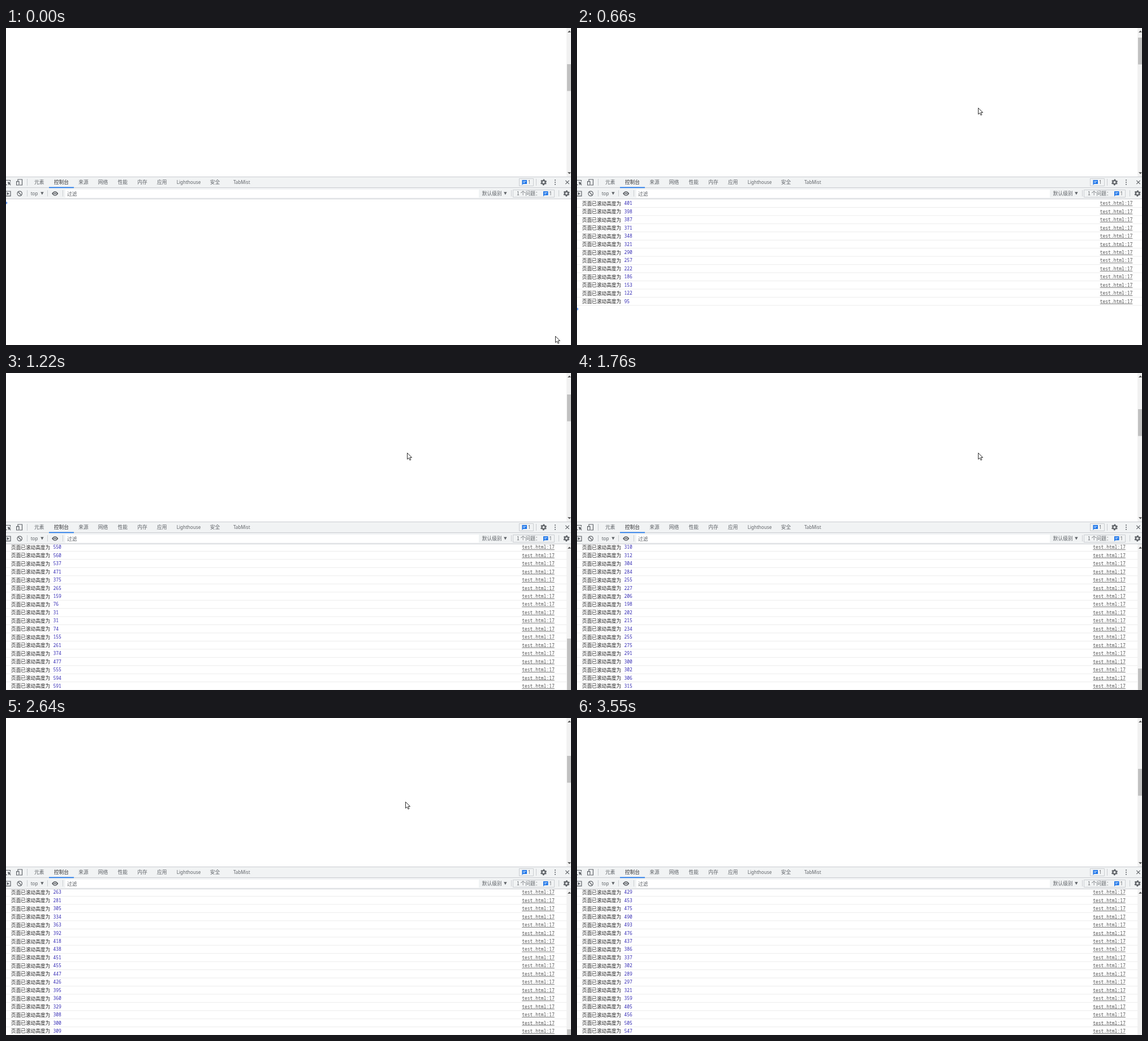
Recreate the animation shown at these times as an HTML page. Size 999 by 561 pixels, loop 4.15 s.

```html
<!DOCTYPE html>
<html lang="zh-CN">
<head>
<meta charset="utf-8">
<style>
html, body { margin: 0; width: 100%; height: 100%; overflow: hidden; background: #fff; }
svg { display: block; width: 999px; height: 561px; }
text { font: 8.1px "Noto Sans", "Noto Sans CJK SC", sans-serif; fill: #5f6368; }
.cjk { font: 8.75px "Noto Sans CJK SC", "Noto Sans CJK", sans-serif; }
.on { fill: #303134; }
.msg { font: 8.65px "Noto Sans CJK SC", "Noto Sans CJK", sans-serif; fill: #222; }
.num, .link { font: 8px "Noto Sans Mono", "DejaVu Sans Mono", monospace; }
.num { fill: #332ab4; }
.link { fill: #545454; text-decoration: underline; }
.ico { fill: none; stroke: #5f6368; stroke-width: 1.2; }
.sep { stroke: #cacdd1; fill: none; }
</style>
</head>
<body>
<svg viewBox="0 0 999 561">
  <defs>
    <g id="gear">
      <circle r="3.1" class="ico" style="stroke-width:2.2"/>
      <circle r="4.6" class="ico" style="stroke-width:1.8" stroke-dasharray="2.4 2.417" transform="rotate(15)"/>
    </g>
    <g id="chat">
      <path d="M0 0h8.5v7h-6.5l-2 2z" fill="#1a73e8"/>
      <path d="M1.7 2.4h5.2M1.7 4.6h3.6" stroke="#fff" stroke-width=".9"/>
    </g>
    <path id="down" d="M0 0h5.4l-2.7 5z" fill="#5f6368"/>
  </defs>

  <rect x="991" width="8" height="263" fill="#f1f1f1"/>
  <path d="M993 8l3.2-3.4 2.8 3zM993 255l3.2 3.4 2.8-3z" fill="#505050"/>
  <rect id="pageThumb" x="992" width="7" height="47.5" fill="#c1c1c1"/>

  <g id="log"></g>
  <path id="prompt" d="M-1 -2.6l2.8 2.6-2.8 2.6" fill="none" stroke="#367cf1" stroke-width="1.3"/>
  <g id="logBar">
    <rect x="991" y="303" width="8" height="258" fill="#f1f1f1"/>
    <path d="M993 311l3.2-3.4 2.8 3z" fill="#505050"/>
    <rect id="logThumb" x="992" width="7" height="120" fill="#c1c1c1"/>
  </g>

  <rect y="263" width="999" height="40" fill="#f1f3f4"/>
  <path class="sep" d="M0 263.5H999M0 282.5H999M0 302.5H999"/>
  <path class="sep" d="M37.5 267v12M937.5 267v12M37.5 287v11M73.5 287v11M100.5 287v11M893.5 287v11M977.5 287v11"/>
  <rect x="76" y="281.5" width="44" height="1.7" fill="#1a73e8"/>
  <rect x="105" y="286" width="731" height="14" fill="#fff"/>
  <g id="tabs"></g>
  <text x="402" y="276.3">TabMist</text>
  <text x="43.7" y="296">top</text>
  <text x="108" y="296.6" class="cjk">过滤</text>
  <text x="841.7" y="296.3" class="cjk">默认级别</text>
  <text x="903" y="296.3" class="cjk">1 个问题：</text>
  <text x="923" y="276.2">1</text>
  <text x="960.5" y="296">1</text>

  <path class="ico" d="M0 269.5h7.5v2.5M0 277.5h2"/>
  <path d="M3 272l6 2.3-2.5 1 2.2 2.2-1 1-2.2-2.2-1 2.2z" fill="#5f6368"/>
  <path class="ico" d="M21 271v-3h7.5v10h-4.5M18.6 271.6h4.4v6.4h-4.4z"/>
  <path class="ico" d="M0 289h8v8.4H0"/>
  <path d="M1.5 290.6l4.5 2.6-4.5 2.6z" fill="#5f6368"/>
  <circle class="ico" cx="24.2" cy="293" r="4.2"/>
  <path class="ico" d="M21.3 290l5.9 6"/>
  <path d="M81 293q5.7-8 11.4 0q-5.7 8-11.4 0z" fill="#5f6368"/>
  <circle cx="86.7" cy="293" r="2" fill="#5f6368" stroke="#f1f3f4" stroke-width="1.1"/>
  <use href="#down" x="61.2" y="290.3"/>
  <use href="#down" x="880.2" y="290.3"/>

  <path class="sep" d="M907.5 266.5h25v13h-25zM896.5 286.5h73v13h-73z"/>
  <use href="#chat" x="912.5" y="269"/>
  <use href="#chat" x="950" y="289"/>
  <use href="#gear" x="950.5" y="273"/>
  <use href="#gear" x="991" y="292.7"/>
  <path d="M971 269.2v.01M971 273v.01M971 276.8v.01" stroke="#5f6368" stroke-width="2.1" stroke-linecap="round"/>
  <path class="ico" d="M989.3 269.8l6.4 6.4m0-6.4l-6.4 6.4"/>

  <path id="cursor" d="M.5 .5v11.2l2.6-2.4 1.9 4 1.8-.8-1.8-3.9h3.6z" fill="#fff" stroke="#222" stroke-width=".95"/>
</svg>
<script>
const LOOP = 4150, STEP = 68.7, FIRST = 40;
const PITCH = 14.45, ROWS = 18, LAST = 172;
const $ = id => document.getElementById(id);
const set = (id, name, value) => $(id).setAttribute(name, value);
const show = (id, on) => set(id, "display", on ? "inline" : "none");

function add(parent, tag, attrs, text) {
  const el = document.createElementNS("http://www.w3.org/2000/svg", tag);
  for (const k in attrs) el.setAttribute(k, attrs[k]);
  if (text) el.textContent = text;
  parent.appendChild(el);
  return el;
}

let x = 50;
for (const name of ["元素", "控制台", "来源", "网络", "性能", "内存", "应用", "Lighthouse", "安全"]) {
  const latin = name === "Lighthouse";
  const kind = latin ? "" : name === "控制台" ? "cjk on" : "cjk";
  add($("tabs"), "text", { x, y: 276.4, class: kind }, name);
  x += name.length * (latin ? 4.2 : 8.75) + 17.2;
}

const rows = Array.from({ length: ROWS }, () => {
  const g = add($("log"), "g", {});
  add(g, "path", { d: "M0 7H999", stroke: "#ececec" });
  add(g, "text", { x: 9, y: 3.3, class: "msg" }, "页面已滚动高度为");
  const num = add(g, "text", { x: 83.5, y: 2.8, class: "num" });
  const link = add(g, "text", { y: 2.8, class: "link" }, "test.html:17");
  return { g, num, link };
});

// Walks keys of [position, value...], easing between neighbours.
function track(keys, at, ease, col = 1) {
  const k = keys.findIndex(key => key[0] > at);
  if (k < 1) return keys[k < 0 ? keys.length - 1 : 0][col];
  const a = keys[k - 1], b = keys[k];
  return a[col] + (b[col] - a[col]) * ease((at - a[0]) / (b[0] - a[0]));
}
const linear = u => u;
const swing = u => (1 - Math.cos(Math.PI * u)) / 2;

// Where the page scroll turns round: [log entry, height].
const turns = [
  [0, 401], [16, 42], [27, 560], [34.5, 25], [42.4, 598], [49.5, 200], [60, 312],
  [66, 198], [73.5, 301], [84.5, 415], [95, 107], [100, 401], [108.3, 251], [119, 455],
  [126, 300], [132, 430], [138, 261], [144, 506], [149.8, 402], [155.8, 494], [162, 289], [171.5, 597]
];
const height = entry => Math.round(track(turns, entry, swing));

const pointer = [
  [FIRST, 971, 545], [450, 709, 141], [2000, 709, 141], [2060, 706, 148],
  [3060, 706, 148], [3480, 971, 537]
];

function draw(time) {
  // The picture advances in even steps; about four entries are logged in each.
  const step = Math.max(0, Math.floor((time - FIRST) / STEP));
  const t = FIRST + step * STEP;
  const count = Math.min(LAST, Math.round(4.18 * Math.max(0, step - 6)));
  const full = count >= 20;
  const top = Math.max(0, count - 20), base = full ? 308.5 : 310.5;

  rows.forEach(({ g, num, link }, k) => {
    g.setAttribute("display", top + k < count ? "inline" : "none");
    g.setAttribute("transform", `translate(0 ${base + k * PITCH})`);
    num.textContent = height(top + k);
    link.setAttribute("x", full ? 912.2 : 924.7);
  });
  set("prompt", "transform", `translate(0 ${base - 1 + (count - top) * PITCH})`);

  show("logBar", full);
  if (full) set("logThumb", "y", Math.max(314, Math.round(314.8 + 281 * (1 - 20.6 / count))));

  // The page runs a few entries ahead of its log.
  const ahead = Math.min(2 * count, count + 3);
  set("pageThumb", "y", Math.round(11 + 0.1325 * height(ahead)));

  show("cursor", t < 3500);
  set("cursor", "transform", `translate(${track(pointer, t, linear)} ${track(pointer, t, linear, 2)})`);
}

const start = performance.now();
function tick() {
  draw((performance.now() - start) % LOOP);
  requestAnimationFrame(tick);
}
draw(0);
requestAnimationFrame(tick);
</script>
</body>
</html>
```
